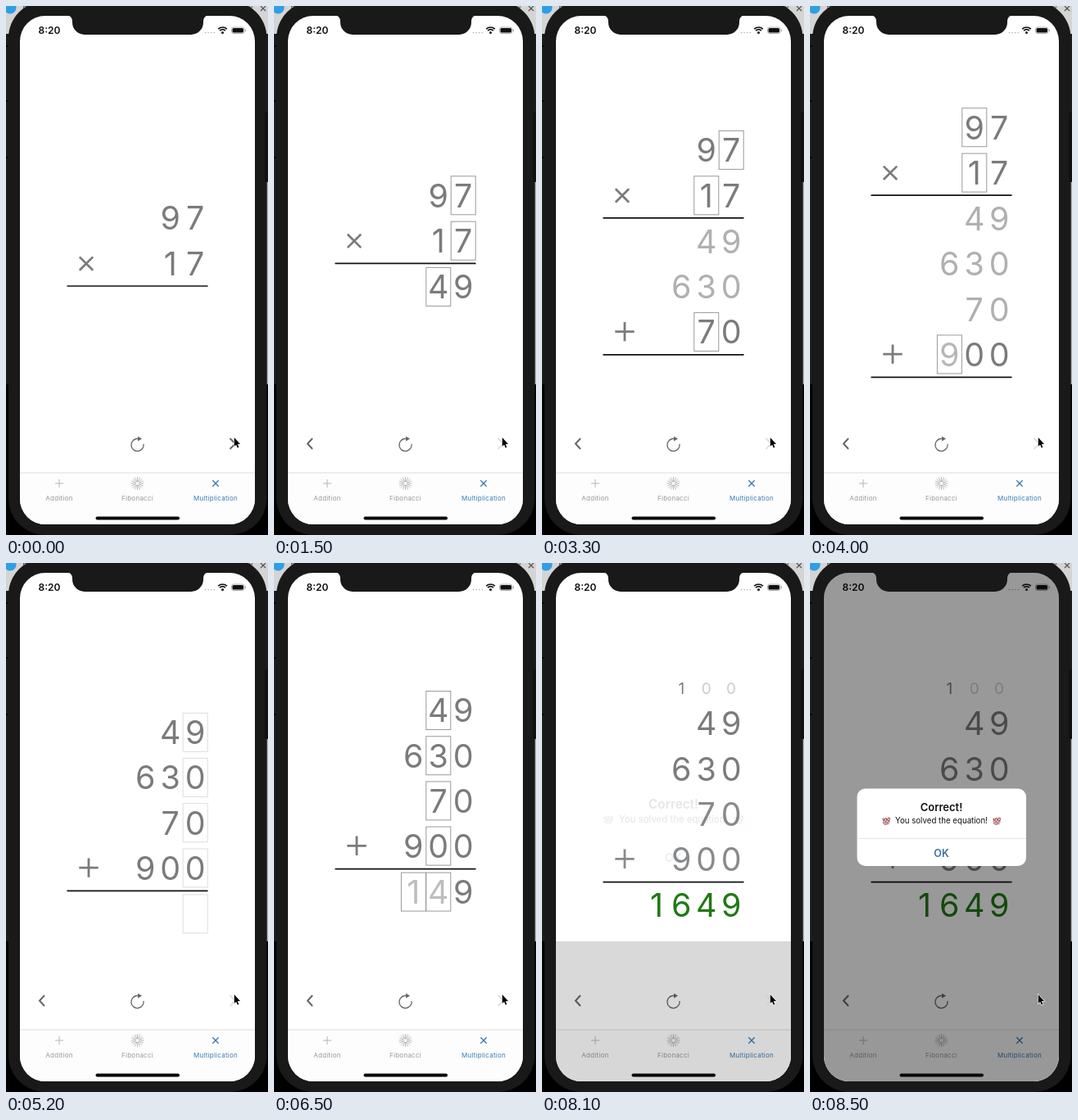
An HTML page with a canvas for the animation above (8.6 s loop, 320 by 646 pixels).

```html
<!DOCTYPE html>
<html lang="en">
<head>
<meta charset="utf-8">
<title>Long multiplication</title>
<style>
  html, body { margin: 0; width: 100%; height: 100%; overflow: hidden; background: #000; }
  canvas { display: block; width: 320px; height: 646px; }
</style>
</head>
<body>
<canvas id="stage"></canvas>
<script>
const W = 320, H = 646, LOOP = 8600, STEP = 100;
const FONT = 'Inter, Roboto, sans-serif';
const GRAY = '#7b7b7b', BEZEL = '#191919', BLUE = '#3a7bb3';
const PITCH = 55.2, COL = 30.4, ONES = 231.1;

const canvas = document.getElementById('stage');
const ratio = window.devicePixelRatio || 1;
canvas.width = W * ratio;
canvas.height = H * ratio;
const c = canvas.getContext('2d');

// Timeline in ms
const products = [
  { digits: '49', pad: 0, start: 500, fills: [850, 1200], top: 0, bottom: 0 },
  { digits: '630', pad: 1, start: 1550, fills: [1950, 2200], top: 1, bottom: 0 },
  { digits: '70', pad: 1, start: 2340, fills: [2850], top: 0, bottom: 1 },
  { digits: '900', pad: 2, start: 3360, fills: [3890], top: 1, bottom: 1 }
];
const SUM = 4300, ANSWER = 5150, DONE = 7700;
const columns = [
  { start: ANSWER, fill: 5650 },
  { start: 6050, fill: 6400 },
  { start: 6900, fill: 7350 }
];
const taps = [
  ...products.flatMap(p => [p.start, ...p.fills]),
  SUM, ...columns.flatMap(s => [s.start, s.fill]), DONE
];

const clamp = x => Math.max(0, Math.min(1, x));
const lerp = (a, b, k) => a + (b - a) * k;
const ramp = (t, start, dur) => clamp((t - start) / dur);
const ease = (t, start, dur = 400) => {
  const x = ramp(t, start, dur);
  return x < .5 ? 2 * x * x : 1 - 2 * (1 - x) * (1 - x);
};
const colX = i => ONES - COL * i;

function withAlpha(a, draw) {
  if (a <= 0) return;
  c.save();
  c.globalAlpha *= a;
  draw();
  c.restore();
}

function line(points, color, width) {
  c.beginPath();
  points.forEach(([x, y], i) => i ? c.lineTo(x, y) : c.moveTo(x, y));
  c.strokeStyle = color;
  c.lineWidth = width;
  c.stroke();
}

function rect(x, y, w, h, color, r = 0) {
  c.beginPath();
  c.roundRect(x, y, w, h, r);
  c.fillStyle = color;
  c.fill();
}

function disc(x, y, r, color) {
  c.beginPath();
  c.arc(x, y, r, 0, 7);
  c.fillStyle = color;
  c.fill();
}

function text(s, x, y, size, color, weight = 400, spacing = 0) {
  c.font = `${weight} ${size}px ${FONT}`;
  c.letterSpacing = spacing + 'px';
  c.fillStyle = color;
  c.textAlign = 'center';
  c.textBaseline = 'alphabetic';
  c.fillText(s, x, y + size * .364);
}

const digit = (d, col, y, a = 1, color = GRAY) =>
  withAlpha(a, () => text(d, colX(col), y, 39.4, color));

function box(col, y, a = 1, h = 47) {
  withAlpha(a, () => {
    c.strokeStyle = '#999';
    c.lineWidth = 1;
    c.strokeRect(colX(col) - 14.9, y - h / 2, 30, h);
  });
}

function number(s, y, a = 1) {
  [...s].reverse().forEach((d, i) => digit(d, i, y, a));
}

function cross(x, y, r, color, width) {
  line([[x - r, y - r], [x + r, y + r]], color, width);
  line([[x - r, y + r], [x + r, y - r]], color, width);
}

function plus(x, y, r, color, width) {
  line([[x - r, y], [x + r, y]], color, width);
  line([[x, y - r], [x, y + r]], color, width);
}

const rule = y => line([[74.5, y], [246.5, y]], '#111', 1.7);

function backdrop() {
  rect(0, 0, W, H, '#000');
  rect(0, 0, W, 462, '#1c1c1c');
  rect(0, 0, W, 34, '#d4d4d4');
  rect(318.5, 215, 1.5, 247, '#b5b5b5');
  [48, 115, 184].forEach(y => rect(0, y, 4, 2, '#050505'));
  disc(5, 2, 7.5, '#2e9fe6');
  text('F', 23, 1, 9, '#555');
  text('e', 299, 1, 9, '#555');
  cross(314, 3, 3, '#555', 1.2);
  rect(3, -6, 315.5, 652, BEZEL, 45);
  rect(316, 130, 4, 84, '#111');
}

function screenPath() {
  c.beginPath();
  c.roundRect(17, 12, 287, 621, 31);
}

function notch() {
  c.beginPath();
  c.moveTo(74, 11);
  c.quadraticCurveTo(81, 12, 81, 19);
  c.arcTo(81, 35, 97, 35, 15);
  c.lineTo(227, 35);
  c.arcTo(241, 35, 241, 19, 15);
  c.lineTo(241, 19);
  c.quadraticCurveTo(241, 12, 248, 11);
  c.closePath();
  c.fillStyle = BEZEL;
  c.fill();
}

function statusBar() {
  text('8:20', 53, 30, 12, '#111', 600);
  for (let i = 0; i < 4; i++) disc(243.5 + 3.6 * i, 32.5, .8, '#aaa');
  [7.5, 4.8].forEach(r => {
    c.beginPath();
    c.arc(264.5, 33.5, r, -Math.PI * .75, -Math.PI * .25);
    c.strokeStyle = '#111';
    c.lineWidth = 1.7;
    c.stroke();
  });
  disc(264.5, 32.5, 1.5, '#111');
  c.beginPath();
  c.roundRect(275.5, 26, 15.5, 7.5, 2.4);
  c.strokeStyle = '#999';
  c.lineWidth = .8;
  c.stroke();
  rect(276.5, 27, 13.5, 5.5, '#111', 1.5);
  rect(291.8, 28.3, 1, 3, '#999', .5);
}

function tabBar() {
  rect(17, 570, 287, 64, '#fdfdfd');
  line([[17, 570], [304, 570]], '#ddd', 1);
  plus(65, 583, 5, '#b5b5b5', 1);
  for (let i = 0; i < 16; i++) {
    const a = i * Math.PI / 8, x = Math.cos(a), y = Math.sin(a);
    line([[160.5 + x * 2, 583 + y * 2], [160.5 + x * 8, 583 + y * 8]], '#aaa', .8);
  }
  cross(256, 583, 3.7, BLUE, 1.3);
  text('Addition', 65, 601, 8, '#999', 400, .25);
  text('Fibonacci', 160.5, 601, 8, '#999', 400, .25);
  text('Multiplication', 256, 601, 8, BLUE, 400, .25);
}

function controls(t) {
  if (t >= 500) line([[47, 528], [41, 534.5], [47, 541]], '#666', 2);

  c.beginPath();
  c.arc(160.5, 536, 7.6, -Math.PI * .05, Math.PI * 1.55);
  c.strokeStyle = '#666';
  c.lineWidth = 1.3;
  c.stroke();
  c.beginPath();
  c.moveTo(161, 525.5);
  c.lineTo(166, 528.5);
  c.lineTo(161, 531.5);
  c.fillStyle = '#666';
  c.fill();

  let a = 1;
  for (const tap of taps) {
    if (t >= tap - 100) a = lerp(.2, 1, ramp(t, tap + 180, 100));
  }
  if (t >= DONE) a = .05;
  withAlpha(a, () => line([[273.5, 528], [280, 534.5], [273.5, 541]], '#666', 2));
}

function cursor() {
  c.beginPath();
  [[278.8, 527], [278.8, 537.8], [281.1, 535.7], [282.8, 539.6], [284.4, 538.9],
   [282.8, 535.1], [286, 534.9]].forEach(([x, y]) => c.lineTo(x, y));
  c.closePath();
  c.strokeStyle = '#fff';
  c.lineWidth = 1.2;
  c.stroke();
  c.fillStyle = '#000';
  c.fill();
}

function factors(y, step, a) {
  withAlpha(a, () => {
    number('97', y);
    number('17', y + 55.4);
    cross(98, y + 55.6, 8.2, GRAY, 2.7);
    rule(y + 83);
    if (step) {
      box(step.top, y);
      box(step.bottom, y + 55.4);
    }
  });
}

function productRow(p, i, y, t) {
  const next = products[i + 1];
  const dim = next ? lerp(1, .6, ramp(t, next.start, 100)) : 1;
  const shade = lerp(dim, 1, ease(t, SUM));
  const shown = ease(t, p.start);
  [...p.digits].reverse().forEach((d, col) => {
    const a = col < p.pad ? shown : ramp(t, p.fills[col - p.pad], 200);
    digit(d, col, y, a * shade);
  });
  const active = t < (next ? next.start : SUM);
  if (!active) return;
  const split = p.fills.length > 1 && t >= p.fills[1] - 100;
  box(p.pad + (split ? 1 : 0), y, shown);
}

function sum(y, t) {
  const answerY = y + 3 * PITCH + 56;
  const stage = columns.filter(s => t >= s.start).length - 1;
  if (stage < 0) return;
  const done = t >= DONE;
  const color = done ? '#1f7a14' : GRAY;
  const fill = i => ramp(t, columns[i].fill, 200);
  digit('9', 0, answerY, fill(0), color);
  digit('4', 1, answerY, fill(1), color);
  if (stage === 1) digit('1', 2, answerY, fill(1));
  digit('6', 2, answerY, fill(2), color);
  digit('1', 3, answerY, fill(2), color);

  const carryY = y - 43, shown = ease(t, columns[2].start);
  ['0', '0', '1'].forEach((d, i) => withAlpha(shown, () =>
    text(d, colX(i), carryY, 19, d === '1' ? GRAY : '#ccc')));

  if (done) return;
  const a = ramp(t, columns[stage].start, 150);
  products.forEach((p, i) => {
    if (stage < p.digits.length) box(stage, y + PITCH * i, a);
  });
  if (stage === 2) box(2, carryY, a, 26);
  box(stage, answerY, a);
  if (stage) box(stage + 1, answerY, a);
}

function equation(t) {
  const count = products.filter(p => t >= p.start).length;
  const grown = products.reduce((n, p) => n + ease(t, p.start), 0);
  const base = 259 - 27.7 * grown;
  let y = lerp(base + 111.6, 207.7, ease(t, SUM));
  y -= 27.7 * ease(t, ANSWER);
  y += 16 * ease(t, columns[2].start);

  factors(y - 111.6, products[count - 1], 1 - ease(t, SUM));
  products.slice(0, count).forEach((p, i) => productRow(p, i, y + PITCH * i, t));
  if (count > 1) {
    withAlpha(ramp(t, products[1].start, 150), () => {
      plus(101, y + PITCH * (count - 1) - .3, 11.7, GRAY, 2.8);
      rule(y + PITCH * (grown - 1) + 28);
    });
  }
  sum(y, t);
}

function hundred(x, y) {
  c.save();
  c.translate(x, y);
  c.rotate(-.15);
  text('100', 0, -1.5, 6, '#94353a', 'italic 800', -.3);
  line([[-4.5, 2], [4.5, 1.4]], '#94353a', 1);
  line([[-3, 4], [3, 3.4]], '#94353a', 1);
  c.restore();
}

function alertBox(t) {
  const p = ramp(t, 8060, 360);
  withAlpha(p, () => {
    const s = lerp(1.2, 1, p);
    c.translate(160.5, 323);
    c.scale(s, s);
    c.translate(-160.5, -323);
    rect(57.5, 275.5, 206.5, 94.5, '#fff', 10);
    text('Correct!', 160.5, 298.5, 13, '#111', 600);
    text('You solved the equation!', 160.5, 314.5, 9.7, '#111');
    hundred(93, 315);
    hundred(228, 315);
    line([[57.5, 336.5], [264, 336.5]], '#dedede', .8);
    text('OK', 160.5, 354, 12.5, '#3a70a2', 600);
  });
}

function draw(t) {
  c.setTransform(ratio, 0, 0, ratio, 0, 0);
  backdrop();
  c.save();
  screenPath();
  c.clip();
  rect(17, 12, 287, 621, '#fff');
  equation(t);
  controls(t);
  tabBar();
  statusBar();
  // The shade reaches the lower part of the screen first
  const shadeTop = t < 8200 ? 462 : 12;
  withAlpha(.4 * ramp(t, 7950, 400), () => rect(17, shadeTop, 287, 633 - shadeTop, '#000'));
  alertBox(t);
  notch();
  rect(109.5, 623.5, 102.5, 4, '#080808', 2);
  c.restore();
  cursor();
}

const origin = performance.now();
function tick() {
  const t = (performance.now() - origin) % LOOP;
  draw(Math.floor(t / STEP) * STEP);
  requestAnimationFrame(tick);
}
tick();
</script>
</body>
</html>
```
